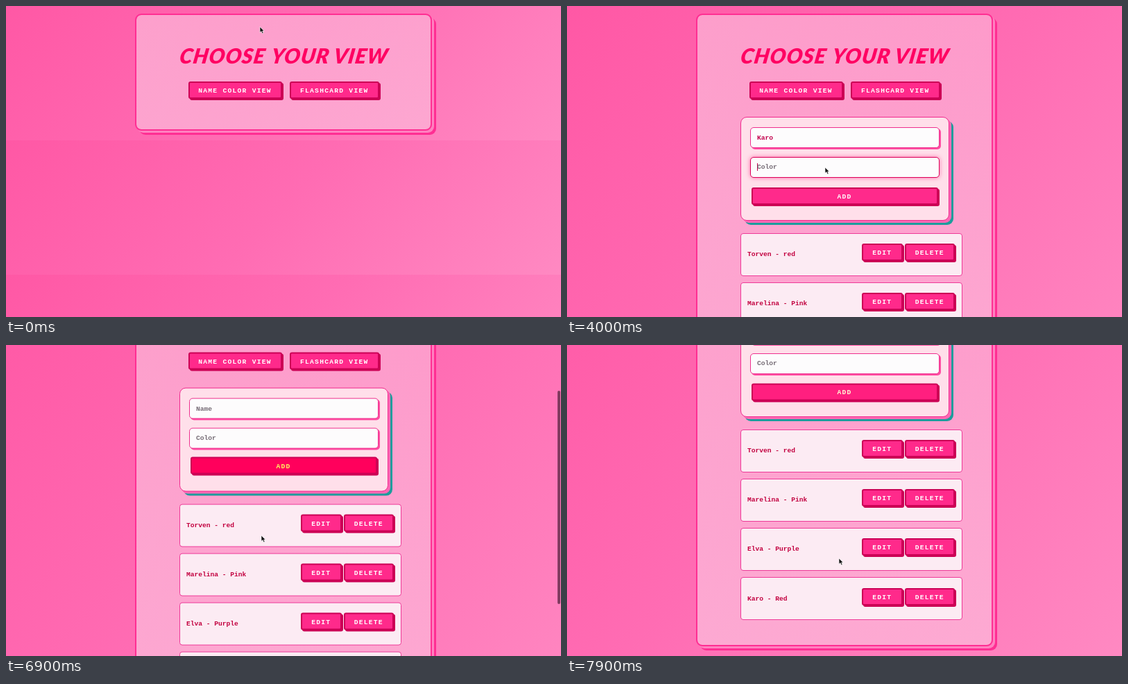
Animation of 800 by 449 pixels, one loop 8000 ms. Source, as an HTML page:

```html
<!DOCTYPE html>
<html lang="en">
<head>
<meta charset="utf-8">
<title>Choose your view</title>
<style>
  html, body { margin: 0; width: 100%; height: 100%; overflow: hidden; }
  #stage { position: relative; width: 800px; height: 449px; overflow: hidden; background: #ff6cb2; }
  #stage div { position: absolute; box-sizing: border-box; white-space: pre; }
  #page {
    left: 0; top: 0; width: 800px; height: 1000px;
    background: linear-gradient(135deg, #ff58a5, #ff6cb3 50%, #ff89c2);
    font: bold 9.6px "Liberation Mono", "Courier New", monospace;
  }
  #list { left: 0; top: 0; }
  #panel {
    left: 186px; top: 11px; width: 428px;
    border: 2px solid #ff2e93; border-radius: 9px;
    background: linear-gradient(90deg, rgba(250, 248, 250, .42), rgba(250, 248, 250, .34));
    background-clip: padding-box;
    box-shadow: 3px 3px #ff80bf, 6px 6px #ff2e93;
  }
  .title {
    top: 52px; color: #ff0062; transform: skewX(-9deg); letter-spacing: 1px;
    font: italic 900 30px/38px Lato, sans-serif;
  }
  .button, .field, .item { display: flex; align-items: center; }
  .button {
    height: 25px; padding-top: 2px; justify-content: center;
    border: 2px solid #cc0055; border-radius: 3px;
    background: #ff2a8b; color: #fff; letter-spacing: 1.28px;
    box-shadow: 2px 2px #cc0055;
  }
  #form {
    left: 250px; top: 160px; width: 301px; height: 150px;
    border: 1.5px solid #f02a8e; border-radius: 9px; background: #ffdfea;
    box-shadow: 3px 3px #ff69b4, 6px 6px #1d9c9c;
  }
  .field {
    left: 264px; width: 273px; height: 30px; padding-left: 9px;
    border: 1.5px solid #ee2f8e; border-radius: 5px;
    background: #fdfcfd; color: #756b75; box-shadow: 2px 2px #ff4da2;
  }
  .field.filled { color: #c2004c; }
  .field.focused { border-color: #dc0058; box-shadow: 0 0 6px #ff6aa8; }
  .field.focused::after { content: ""; width: 1px; height: 11px; background: #c2004c; }
  .field.focused:not(.filled)::after { order: -1; margin-right: -1px; }
  .item {
    left: 250px; width: 320px; height: 62px; padding-left: 9px;
    border: 1px solid #ee3a98; border-radius: 4px; background: #fcebf3; color: #c2003f;
  }
  #thumb { left: 795px; width: 4px; border-radius: 2px; background: #6b3050; }
  #pointer { position: absolute; left: 0; top: 0; overflow: visible; }
</style>
</head>
<body>
<div id="stage">
  <div id="page">
    <div id="panel"></div>
    <div class="title" style="left:251px">CHOOSE</div>
    <div class="title" style="left:383px">YOUR</div>
    <div class="title" style="left:473px">VIEW</div>
    <div id="list"><div id="form"></div></div>
  </div>
  <div id="thumb"></div>
  <svg id="pointer" width="12" height="14">
    <path d="M0 0V8.3L2 6.6 3.5 9.8 5 9.1 3.6 6.1H6Z" fill="#111" stroke="#fff" stroke-width=".6"/>
  </svg>
</div>
<script>
const DURATION = 8000, VIEW_HEIGHT = 449;
const OPEN_AT = 800, ADD_AT = 6000;
const $ = id => document.getElementById(id);
const page = $("page"), panel = $("panel"), list = $("list"), thumb = $("thumb"), pointer = $("pointer");

function add(parent, className, style, text = "") {
  const el = document.createElement("div");
  el.className = className;
  el.textContent = text;
  for (const key in style) el.style[key] = style[key] + "px";
  parent.append(el);
  return el;
}

const button = (parent, left, top, width, text) => add(parent, "button", { left, top, width }, text);

const viewButton = button(page, 262.5, 109, 135, "NAME COLOR VIEW");
button(page, 409, 109, 128.5, "FLASHCARD VIEW");
const nameField = add(list, "field", { top: 175 });
const colorField = add(list, "field", { top: 217.5 });
const addButton = button(list, 265.5, 262, 269, "ADD");

const items = ["Torven - red", "Marelina - Pink", "Elva - Purple", "Karo - Red"].map((text, i) => {
  const item = add(list, "item", { top: 327.5 + i * 71.2 }, text);
  button(item, 174, 14.5, 58.5, "EDIT");
  button(item, 235.5, 14.5, 72.5, "DELETE");
  return item;
});

const clamp = x => Math.min(1, Math.max(0, x));
const smooth = x => x * x * (3 - 2 * x);
const ramp = (t, start, length) => smooth(clamp((t - start) / length));
const mix = (a, b, k) => `rgb(${a.map((v, i) => v + (b[i] - v) * k)})`;

// Keys are [time, ...values]; eases from each key to the next.
function track(keys, t) {
  const next = keys.findIndex(key => key[0] > t);
  if (next < 0) return keys[keys.length - 1].slice(1);
  const a = keys[Math.max(0, next - 1)], b = keys[next];
  const k = ramp(t, a[0], b[0] - a[0] || 1);
  return a.slice(1).map((v, i) => v + (b[i + 1] - v) * k);
}

const pointerPath = [
  [0, 366, 30], [100, 366, 30], [600, 326, 119], [900, 326, 119], [1200, 314, 141],
  [1600, 334, 186], [3300, 334, 186], [3700, 372, 233], [5200, 372, 233],
  [5400, 375, 251], [5700, 368, 275], [7450, 368, 275], [7850, 392, 308]
];

function scrollAt(t) {
  return 206 * (1 - (1 - ramp(t, 6550, 950)) ** 1.76);
}

function hover(el, k) {
  el.style.transform = `translateY(${-2 * k}px)`;
  el.style.background = mix([255, 42, 139], [255, 0, 92], k);
  el.style.color = mix([255, 255, 255], [255, 250, 95], k);
}

function fill(field, placeholder, value, t, start, step, focusAt, blurAt) {
  const typed = t < ADD_AT ? value.slice(0, Math.max(0, Math.floor((t - start) / step) + 1)) : "";
  const focused = t >= focusAt && t < blurAt;
  field.textContent = typed || placeholder;
  field.classList.toggle("filled", typed !== "");
  field.classList.toggle("focused", focused);
}

function render(t) {
  const open = t >= OPEN_AT, added = t >= ADD_AT;
  const bodyHeight = !open ? 194 : added ? 655 : 584;
  const scroll = scrollAt(t);

  list.style.display = open ? "" : "none";
  items[3].style.display = added ? "" : "none";
  panel.style.height = bodyHeight - 25 + "px";
  page.style.backgroundSize = `800px ${bodyHeight}px`;
  page.style.transform = `translateY(${-scroll}px)`;

  hover(viewButton, ramp(t, 450, 250) - ramp(t, 1200, 300));
  hover(addButton, ramp(t, 5500, 250) - ramp(t, 7700, 300));
  fill(nameField, "Name", "Karo", t, 2100, 200, 1700, 3800);
  fill(colorField, "Color", "Red", t, 4400, 250, 3800, 5900);

  thumb.style.height = VIEW_HEIGHT ** 2 / 655 + "px";
  thumb.style.top = scroll * VIEW_HEIGHT / 655 - 1 + "px";
  thumb.style.opacity = .85 * (ramp(t, 6550, 100) - ramp(t, 7600, 300));

  const [x, y] = track(pointerPath, t);
  const typing = (t >= 2100 && t < 3300) || (t >= 4400 && t < 5200);
  pointer.style.transform = `translate(${x}px, ${y}px)`;
  pointer.style.visibility = typing ? "hidden" : "visible";
}

const begin = performance.now();
function tick() {
  render((performance.now() - begin) % DURATION);
  requestAnimationFrame(tick);
}
tick();
</script>
</body>
</html>
```
